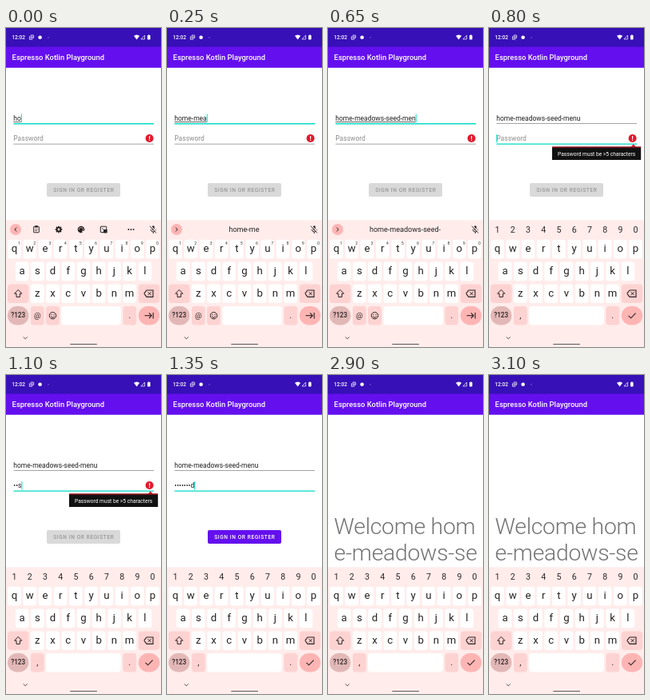
Write an HTML page with a canvas that moves like this. It is 194 px wide and 399 px high and loops after 3.15 s.

```html
<!DOCTYPE html>
<html lang="en">
<head>
<meta charset="utf-8">
<title>Login form</title>
<style>
html, body { margin: 0; width: 100%; height: 100%; overflow: hidden; background: #fff; }
canvas { display: block; width: 194px; height: 399px; }
</style>
</head>
<body>
<canvas id="stage"></canvas>
<script>
const W = 194, H = 399, LOOP = 3150, STEP = 50;
const USER = 'home-meadows-seed-menu';
const PASS = 'password';
const INK = '#2b2020', TEAL = '#03dac5', BOARD = '#ffeceb', KEY = '#fdd3d2', ACCENT = '#fdb5b4';

const canvas = document.getElementById('stage');
const ctx = canvas.getContext('2d');
const dpr = window.devicePixelRatio || 1;
canvas.width = Math.round(W * dpr);
canvas.height = Math.round(H * dpr);

function rect(x, y, w, h, color, r = 0) {
  ctx.fillStyle = color;
  ctx.beginPath();
  ctx.roundRect(x, y, w, h, r);
  ctx.fill();
}

function disc(x, y, r, color) {
  ctx.fillStyle = color;
  ctx.beginPath();
  ctx.arc(x, y, r, 0, Math.PI * 2);
  ctx.fill();
}

function arc(x, y, r, from, to, color, w = 1) {
  ctx.strokeStyle = color;
  ctx.lineWidth = w;
  ctx.beginPath();
  ctx.arc(x, y, r, from, to);
  ctx.stroke();
}

function frame(x, y, w, h, color, lw = 1, r = 0.5) {
  ctx.strokeStyle = color;
  ctx.lineWidth = lw;
  ctx.beginPath();
  ctx.roundRect(x, y, w, h, r);
  ctx.stroke();
}

function trace(points) {
  ctx.beginPath();
  for (let i = 0; i < points.length; i += 2) ctx.lineTo(points[i], points[i + 1]);
}

function line(points, color, w = 1) {
  trace(points);
  ctx.strokeStyle = color;
  ctx.lineWidth = w;
  ctx.stroke();
}

function shape(points, color) {
  trace(points);
  ctx.fillStyle = color;
  ctx.fill();
}

// Draws text and returns its width.
function text(str, x, y, size, color, { weight = 400, align = 'left', gap = 0 } = {}) {
  ctx.font = `${weight} ${size}px Roboto, sans-serif`;
  ctx.letterSpacing = gap + 'px';
  ctx.textAlign = align;
  ctx.fillStyle = color;
  ctx.fillText(str, x, y);
  return ctx.measureText(str).width;
}

function header() {
  rect(0, 0, W, 49.8, '#640fee');
  rect(0, 0, W, 23.4, '#3710b7');
  text('12:02', 7.3, 14, 6.6, '#fff', { weight: 500 });
  // overlapping windows
  frame(31, 9, 3.6, 3.6, '#fff', 0.8);
  rect(32.2, 10.2, 1.2, 1.2, '#fff');
  line([29.4, 10.4, 29.4, 14.2, 33.2, 14.2], '#fff', 0.8);
  disc(42.6, 11.7, 2.3, '#fff');
  disc(53, 11.9, 0.7, 'rgba(255,255,255,.5)');
  // wifi, signal, battery
  shape([160, 9.8, 161.8, 8.9, 163.6, 8.6, 165.4, 8.9, 167.2, 9.8, 163.6, 14.4], '#fff');
  line([168.9, 14, 173.6, 14, 173.6, 9.1, 168.9, 14], '#fff', 0.7);
  rect(177, 9.1, 3.6, 5.3, '#fff', 0.6);
  rect(178, 8.4, 1.6, 1.2, '#fff');
  text('Espresso Kotlin Playground', 7.55, 40, 9.43, '#fff', { weight: 500 });
}

function underline(y, focused) {
  if (focused) rect(9.5, y - 0.5, 175.5, 1.3, TEAL);
  else rect(9.5, y - 0.3, 175.5, 0.8, '#858585');
}

function errorMark() {
  disc(179.6, 138, 5, '#e2192c');
  rect(179, 135, 1.2, 3.8, '#fff');
  rect(179, 139.8, 1.2, 1.2, '#fff');
}

function errorPopup() {
  shape([177.5, 149, 180.7, 145.2, 184, 149], '#e2192c');
  rect(79, 148.6, 111.2, 16.4, '#111', 0.5);
  rect(79, 148.6, 111.2, 1, '#d8182a');
  text('Password must be >5 characters', 86, 159.6, 6.68, '#fff');
}

function form(s) {
  const onPass = s.focus === 'pass';
  const nameW = text(USER.slice(0, s.typed), 9.3, 116, 8.5, '#222');
  if (!onPass) {
    rect(9.3, 117, nameW, 0.7, '#333');
    rect(9.3 + nameW, 107.5, 1, 10.5, TEAL);
  }
  underline(119.6, !onPass);

  let passW = 0;
  if (s.pass) {
    const shown = '•'.repeat(s.pass - 1) + PASS[s.pass - 1];
    passW = text(shown, 9.3, 141.4, 8.5, '#222');
  } else {
    text('Password', 9.3, 141.4, 8.5, '#8c8c8c');
  }
  if (onPass) rect(9.3 + passW, 133, 1, 10.5, TEAL);
  underline(145, onPass);

  const valid = s.pass > 5;
  if (!valid) {
    errorMark();
    if (onPass) errorPopup();
  }
  const fill = !valid ? '#d9d9d9' : s.pressed ? '#8a42f2' : '#640fee';
  rect(51, 194, 92, 17, fill, 2);
  text('SIGN IN OR REGISTER', 97.3, 205, 6.6, valid ? '#fff' : '#999',
    { weight: 500, align: 'center', gap: 0.58 });
}

function welcome() {
  const opts = { weight: 300, gap: -0.236 };
  text('Welcome ' + USER.slice(0, 3), 7.55, 198.8, 28.29, '#737373', opts);
  text(USER.slice(3, 15), 7.55, 231.9, 28.29, '#737373', opts);
}

function toolIcons() {
  // clipboard
  frame(34.7, 248.4, 6.6, 7.4, INK, 1);
  rect(36.2, 247.2, 3.6, 2.4, INK);
  line([36.2, 251.8, 39.8, 251.8], INK, 0.7);
  line([36.2, 253.6, 39, 253.6], INK, 0.7);
  // gear
  for (let i = 0; i < 4; i++) {
    const a = i * Math.PI / 4, c = Math.cos(a) * 4.3, d = Math.sin(a) * 4.3;
    line([66 - c, 252 - d, 66 + c, 252 + d], INK, 1.7);
  }
  disc(66, 252, 3.3, INK);
  disc(66, 252, 1.4, BOARD);
  // palette
  disc(94, 252, 4.3, INK);
  for (let i = 0; i < 4; i++) {
    const a = Math.PI * (1.05 + i * 0.3);
    disc(94 + Math.cos(a) * 2.6, 252 + Math.sin(a) * 2.6, 0.7, BOARD);
  }
  disc(96.7, 254.8, 1.5, BOARD);
  // resize
  frame(118.3, 248.2, 7.4, 7.4, INK, 1);
  rect(122, 252, 4.6, 4.4, INK);
  line([120, 250, 122.5, 252.5], INK, 0.8);
  // more
  for (let i = -1; i <= 1; i++) disc(156.5 + i * 3.1, 252, 0.95, INK);
}

function micOff() {
  rect(182.8, 247.2, 3, 5.8, INK, 1.5);
  arc(184.3, 251.8, 3.1, 0, Math.PI, INK, 0.9);
  line([184.3, 255, 184.3, 257], INK, 1);
  line([181, 247.5, 189, 256], BOARD, 1.2);
  line([180, 247.7, 188, 256.4], INK, 0.9);
}

function strip(s) {
  disc(12, 252, 7, ACCENT);
  const d = s.candidate ? 1.2 : -1.2;
  line([12 - d, 249.5, 12 + d, 252, 12 - d, 254.5], INK, 1);
  if (s.candidate) text(s.candidate, 96.5, 255.2, 9.05, '#222', { align: 'center' });
  else toolIcons();
  micOff();
}

function letterRow(letters, first, y, hints) {
  [...letters].forEach((ch, i) => {
    const x = first + i * 19.22;
    rect(x - 8.4, y, 16.8, 23.6, '#fff', 3.2);
    text(ch, x, y + 15.5, 13.2, '#262222', { align: 'center' });
    if (hints) text(String((i + 1) % 10), x + 6, y + 6.6, 5.4, '#443b3b', { align: 'center' });
  });
}

function keyboard(s) {
  const secret = s.keys === 'pass';
  rect(0, 240.2, W, H - 240.2, BOARD);
  if (secret) {
    for (let i = 0; i < 10; i++) {
      text(String((i + 1) % 10), 10.6 + i * 19.22, 255.7, 10.6, '#2f2828', { align: 'center' });
    }
  } else {
    strip(s);
  }
  letterRow('qwertyuiop', 10.5, 264.8, !secret);
  letterRow('asdfghjkl', 20.1, 292.6, false);
  letterRow('zxcvbnm', 39.3, 320.4, false);

  // shift and backspace
  rect(2, 320.4, 26.4, 23.6, KEY, 4);
  line([15.2, 327.4, 10.6, 332.2, 13, 332.2, 13, 336.4, 17.4, 336.4, 17.4, 332.2, 19.8, 332.2, 15.2, 327.4], INK, 1);
  rect(165.8, 320.4, 26.4, 23.6, KEY, 4);
  line([172.8, 332.2, 176, 328, 184, 328, 184, 336.4, 176, 336.4, 172.8, 332.2], INK, 1.1);
  line([177.6, 330.2, 181.6, 334.2], INK, 1);
  line([181.6, 330.2, 177.6, 334.2], INK, 1);

  // bottom row
  const y = 348;
  rect(2, y, 26.4, 23.4, '#e2b8b7', 11.7);
  text('?123', 15.2, y + 14.4, 8.2, INK, { weight: 500, align: 'center' });
  rect(30.9, y, 16.8, 23.4, KEY, 3.6);
  text(secret ? ',' : '@', 39.3, y + 15, secret ? 11 : 9.6, INK, { align: 'center' });
  if (secret) {
    rect(50, y, 93.8, 23.4, '#fff', 3.6);
  } else {
    rect(50.1, y, 16.8, 23.4, KEY, 3.6);
    arc(58.5, 359.7, 4.2, 0, Math.PI * 2, INK);
    disc(57, 358.6, 0.7, INK);
    disc(60, 358.6, 0.7, INK);
    arc(58.5, 360, 2.2, 0.2, Math.PI - 0.2, INK);
    rect(69.4, y, 74.4, 23.4, '#fff', 3.6);
  }
  rect(146.4, y, 16.8, 23.4, KEY, 3.6);
  text('.', 154.8, y + 15, 11, INK, { align: 'center' });
  rect(165.8, y, 26.4, 23.4, ACCENT, 11.7);
  if (secret) {
    line([174.6, 359.8, 177.6, 362.8, 183.6, 356.6], INK, 1.1);
  } else {
    line([173.6, 359.7, 182, 359.7], INK, 1.1);
    line([179, 356.4, 182.2, 359.7, 179, 363], INK, 1.1);
    line([184.2, 356, 184.2, 363.4], INK, 1.1);
  }
  line([21.7, 386.4, 24.2, 388.8, 26.7, 386.4], '#4a3d3d', 0.9);
  rect(80.2, 395, 33.8, 1.1, '#5f5656', 0.5);
}

function stateAt(ms) {
  const k = Math.floor(ms / STEP + 1e-6);
  const typed = Math.min(USER.length, Math.floor(k <= 5 ? 2 + 1.2 * k + 1e-6 : 8 + 1.625 * (k - 5)));
  return {
    typed,
    candidate: k < 2 ? '' : USER.slice(0, Math.floor(typed * 0.88)),
    focus: k < 15 ? 'user' : 'pass',
    keys: k < 16 ? 'user' : 'pass',
    pass: Math.max(0, Math.min(PASS.length, k - 19)),
    pressed: k >= 28,
    welcome: k < 30 ? 0 : k === 30 ? 0.6 : 1
  };
}

function draw() {
  const s = stateAt(performance.now() % LOOP);
  ctx.setTransform(canvas.width / W, 0, 0, canvas.height / H, 0, 0);
  rect(0, 0, W, H, '#fff');
  header();
  if (s.welcome) {
    ctx.globalAlpha = s.welcome;
    welcome();
    ctx.globalAlpha = 1;
  } else {
    form(s);
  }
  keyboard(s);
  requestAnimationFrame(draw);
}
draw();
</script>
</body>
</html>
```
